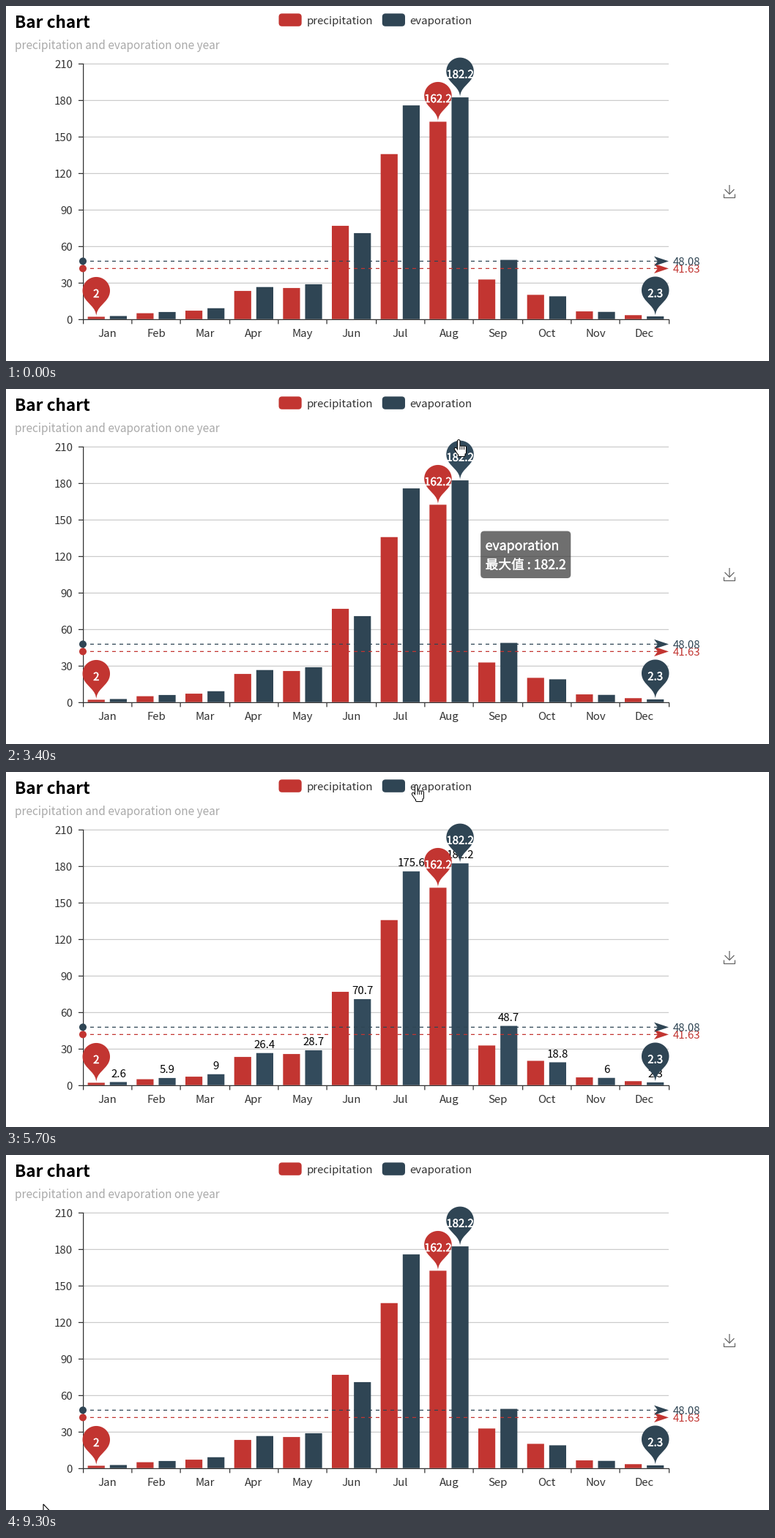
A matplotlib script that plays this animation: 1042x486 px, repeating every 9600 ms.

```python
import numpy as np
import matplotlib.pyplot as plt
from matplotlib.animation import FuncAnimation
from matplotlib.patches import Circle, FancyBboxPatch, PathPatch, Polygon, Rectangle
from matplotlib.path import Path
from matplotlib.patheffects import withStroke

W, H, DPI = 1042, 486, 64
PT = 72 / DPI                       # points per pixel
ZOOM = 1.25                         # screen pixels per layout pixel
FRAMES = 96
LEFT, RIGHT, TOP, BASE = 105, 905, 78.75, 428.75
BAND = (RIGHT - LEFT) / 12
UNIT = (BASE - TOP) / 210
PIN_R = 18.75

MONTHS = "Jan Feb Mar Apr May Jun Jul Aug Sep Oct Nov Dec".split()
NAMES = ["precipitation", "evaporation"]
DATA = np.array([
    [2.0, 4.9, 7.0, 23.2, 25.6, 76.7, 135.6, 162.2, 32.6, 20.0, 6.4, 3.3],
    [2.6, 5.9, 9.0, 26.4, 28.7, 70.7, 175.6, 182.2, 48.7, 18.8, 6.0, 2.3],
])
COLORS = ["#c23531", "#2f4554"]
LIT = ["#d53a35", "#334b5c"]
OFF = "#cccccc"
LEGEND_X = [372.5, 513.8]
LEGEND_W = [129, 124]

# (time, which series are on afterwards)
TOGGLES = [(4.4, (0, 1)), (5.2, (1, 1)), (6.3, (1, 0)), (7.2, (1, 1))]
SHOWN = [(0.4, 4.4), (5.6, 6.3), (7.8, 9.1), (9.3, 9.6)]
ARROW = [(0, 0), (0, 17), (4, 13.4), (6.6, 19), (9, 18), (6.5, 12.4), (11.5, 12.2)]

plt.rcParams["font.family"] = "Noto Sans CJK JP"
fig = plt.figure(figsize=(W / DPI, H / DPI), dpi=DPI, facecolor="white")
ax = fig.add_axes([0, 0, 1, 1])
ax.set(xlim=(0, W), ylim=(H, 0))
ax.axis("off")
live = []                           # artists redrawn in every frame


def crisp(v):
    """Centre of the layout pixel that a hairline at v falls on."""
    return (np.round(2 * v / ZOOM) // 2 + 0.5) * ZOOM


def lerp(a, b, e):
    return a + (b - a) * e


def put(patch, z):
    patch.set_zorder(z)
    ax.add_patch(patch)
    live.append(patch)


def text(x, y, s, size=15, color="#333333", ha="center", z=3, **kw):
    if color == "white":
        kw["path_effects"] = [withStroke(linewidth=0.4 * PT, foreground=color)]
    t = ax.text(x, y + 0.36 * size, s, fontsize=size * PT, color=color, ha=ha,
                va="baseline", zorder=z, **kw)
    live.append(t)
    return t


def line(xs, ys, color, z, width=ZOOM, cap="butt", **kw):
    live.extend(ax.plot(xs, ys, color=color, lw=width * PT, zorder=z, snap=False,
                        solid_capstyle=cap, dash_capstyle=cap, **kw))


def round_box(x, y, w, h, r, color, z, alpha=1):
    style = f"round,pad=0,rounding_size={r}"
    put(FancyBboxPatch((x, y), w, h, boxstyle=style, fc=color, ec="none", alpha=alpha), z)


def slot(mode, s):
    """Offset and width of a bar within its band."""
    room = BAND * 0.8
    if sum(mode) == 1:
        return np.array([BAND * 0.1, room])
    w = room / 2.3
    return np.array([BAND * 0.1 + s * 1.3 * w, w])


def pointer_keys():
    """Time and place: a sweep across the bars, then a few stops."""
    keys = [(0.4, 150, 440)]
    for k in range(15):
        i, s = divmod(k, 2)
        off, w = slot((1, 1), s)
        keys.append((0.5 + k / 7, LEFT + i * BAND + off + w / 4,
                     BASE - 0.8 * DATA[s, i] * UNIT))
    keys += [(2.7, 616, 205), (3.3, 631, 260), (3.4, 618, 72), (3.6, 540, 6),
             (4.1, 440, 18), (5.6, 440, 20), (5.7, 560, 20), (6.2, 560, 20),
             (7.8, 450, 14), (7.9, 450, 14), (8.3, 27, 358), (8.4, 27, 358),
             (8.7, 2, 430), (8.9, 51, 478)]
    return np.array(keys)


KEYS = pointer_keys()


def pointer(t):
    return np.array([np.interp(t, KEYS[:, 0], KEYS[:, k]) for k in (1, 2)])


def tip_track():
    """The tooltip trails the pointer and flips above it near the bottom."""
    pos, track = np.array([300.0, 12.0]), []
    for n in range(FRAMES):
        goal = pointer(n / 10) + 25
        if goal[1] + 65 > H:
            goal[1] -= 115
        if n > 5:
            pos = lerp(pos, goal, 0.45)
        track.append(pos)
    return track


TIPS = tip_track()


def pin_path(x, y):
    r, size = PIN_R, PIN_R / 0.3
    dy = r * r / (size - r)
    cy = y - size + r + dy
    a = np.arcsin(dy / r)
    dx, sx, sy = np.cos(a) * r, np.sin(a) * r * 0.6, np.cos(a) * r * 0.6
    th = np.linspace(np.pi - a, 2 * np.pi + a, 60)
    arc = list(zip(x + r * np.cos(th), cy + r * np.sin(th)))
    low = cy + dy
    curve = [(x + dx - sx, low + sy), (x, y - r * 0.7), (x, y),
             (x, y - r * 0.7), (x - dx + sx, low + sy), (x - dx, low)]
    codes = [Path.MOVETO] + [Path.LINETO] * (len(arc) - 1) + [Path.CURVE4] * 6
    return Path(arc + curve, codes)


def modes(t):
    """Series switched on before and after the latest toggle, and eased progress."""
    old, new, p = (1, 1), (1, 1), 1.0
    for start, after in TOGGLES:
        if t > start - 0.01:
            old, new = new, after
            p = np.clip((t - start + 0.05) / 0.3, 0, 1)
    return old, new, 1 - (1 - p) ** 3


def top_value(mode):
    return 180 if mode == (1, 0) else 210


def marks(s):
    return [(DATA[s].argmax(), "最大值"), (DATA[s].argmin(), "最小值")]


def visible(t):
    return any(a - 0.01 < t < b - 0.01 for a, b in SHOWN)


def hit(t):
    """What lies under the pointer: (kind, series, index, label)."""
    if not visible(t):
        return None
    x, y = pointer(t)
    for s in (0, 1):
        if 0 <= x - LEGEND_X[s] <= LEGEND_W[s] and 10 <= y <= 28:
            return "legend", s, -1, ""
    for s in (1, 0):
        off, w = slot((1, 1), s)
        for i, name in marks(s):
            cx = LEFT + i * BAND + off + w / 2
            cy = BASE - DATA[s, i] * UNIT - 35.7
            if np.hypot(x - cx, y - cy) < PIN_R:
                return "pin", s, i, name
        i = int((x - LEFT) // BAND)
        if 0 <= i < 12 and 0 <= x - LEFT - i * BAND - off <= w:
            if BASE - DATA[s, i] * UNIT <= y <= BASE:
                return "bar", s, i, MONTHS[i]
    return None


def draw_axis(unit, limit):
    for v in range(0, limit + 1, 30):
        y = crisp(TOP if v == limit == 210 else BASE - v * unit)
        if v:
            line([LEFT, RIGHT], [y, y], "#cccccc", 1)
        line([LEFT - 6, LEFT], [y, y], "#333333", 2.5)
        text(91, y + 0.6, str(v), ha="right")
    x, y = crisp(LEFT), crisp(BASE)
    line([x, x], [TOP, y + 0.6], "#333333", 2.5)
    line([LEFT, RIGHT + 1], [y, y], "#333333", 2.5)
    for i in range(13):
        x = crisp(LEFT + i * BAND)
        line([x, x], [y, y + 6], "#333333", 2.5)
    for i, name in enumerate(MONTHS):
        text(LEFT + (i + 0.5) * BAND, 448, name)


def draw_series(s, old, new, e, unit, over):
    if not new[s] and (e >= 1 or not old[s]):
        return
    grow = 1
    if not new[s]:
        off, w = slot(old, s)
        w *= 1 - e
    elif not old[s]:
        off, w = slot(new, s)
        grow = e
    else:
        off, w = lerp(slot(old, s), slot(new, s), e)

    for i, v in enumerate(DATA[s]):
        x, h = LEFT + i * BAND + off, v * unit * grow
        lit = over and over[1] == s and (
            over[0] == "legend" or (over[0] == "bar" and over[2] == i))
        put(Rectangle((x, BASE - h), w, h, fc=LIT[s] if lit else COLORS[s],
                      ec="none", snap=False), 2)
        if lit:
            text(x + w / 2, BASE - h - 12, f"{v:g}", color="black")
    if not new[s]:
        return

    mean = np.floor(DATA[s].mean() * 100 + 0.5001) / 100
    y, c = crisp(BASE - mean * unit), COLORS[s]
    line([LEFT, RIGHT - 15], [y, y], c, 4, ls=(0, (4, 4)))
    put(Circle((LEFT, y), 5, fc=c, ec="none"), 4)
    put(Polygon([(RIGHT, y), (RIGHT - 20, y - 6.7), (RIGHT - 15, y),
                 (RIGHT - 20, y + 6.7)], fc=c, ec="none"), 4)
    text(911, y + 0.7, f"{mean:.2f}", color=c, ha="left", z=4)

    for i, _ in marks(s):
        x = LEFT + i * BAND + off + w / 2
        y = BASE - DATA[s, i] * unit * grow
        lit = over and over[:3] == ("pin", s, i)
        put(PathPatch(pin_path(x, y), fc=LIT[s] if lit else c, ec="none"), 5 + s * 0.2)
        text(x, y - 31.8, f"{DATA[s, i]:g}", color="white", z=5.1 + s * 0.2)


def draw_legend(new):
    for s in (0, 1):
        x = LEGEND_X[s]
        round_box(x, 10.3, 31.2, 17.5, 4.5, COLORS[s] if new[s] else OFF, 3)
        text(x + 37.7, 20, NAMES[s], color="#333333" if new[s] else OFF, ha="left")


def draw_tip(n, over):
    kind, s, i, label = over
    x, y = TIPS[n]
    dot = kind == "bar"
    sep = ": " if dot else " : "
    indent = 18.5 if dot else 0
    style = dict(size=17.7, color="white", ha="left", z=8)
    a = text(x + 6.5, y + 19.5, NAMES[s], **style)
    b = text(x + 6.5 + indent, y + 45.5, f"{label}{sep}{DATA[s, i]:g}", **style)
    wide = max(a.get_window_extent().width, b.get_window_extent().width + indent)
    round_box(x, y, wide + 13, 64.5, 5, "#323232", 7, alpha=0.7)
    if dot:
        put(Circle((x + 12.7, y + 46.2), 6, fc=COLORS[s], ec="none"), 8)


def draw_hand(x, y):
    # a black shape one pixel larger lies under the white one
    for rim, color, z in ((1, "black", 9), (0, "white", 9.1)):
        for px, py, w, h in ((-1, 0, 2.5, 14), (-1, 8.5, 11, 10), (0, 13, 8.5, 9)):
            round_box(x + px - rim, y + py - 2 - rim, w + 2 * rim, h + 2 * rim,
                      1.2 + rim, color, z)
        line([x - 4, x], [y + 10, y + 16], color, z, 2.5 + 2 * rim, "round")
    for dx in (2, 4.8, 7.6):
        line([x + dx] * 2, [y + 6.5, y + 11], "black", 9.2, 0.9)


def draw_pointer(t, over):
    x, y = pointer(t)
    if over:
        draw_hand(x, y)
    else:
        put(Polygon(np.array(ARROW) + (x, y), fc="white", ec="black", lw=1.1 * PT), 9)


def draw_fixed():
    text(12, 22, "Bar chart", 22.5, "black", "left", weight="bold")
    text(12, 53.5, "precipitation and evaporation one year", 15.4, "#aaaaaa", "left")
    line([980.5, 980.5, 995.5, 995.5], [257.5, 262.5, 262.5, 257.5], "#666666", 3)
    line([988, 988], [245, 257.5], "#666666", 3)
    line([981.5, 988, 994.5], [251, 257.5, 251], "#666666", 3)
    live.clear()


def draw(n):
    for a in live:
        a.remove()
    live.clear()
    t = n / 10
    old, new, e = modes(t)
    limit = top_value(new)
    unit = lerp((BASE - TOP) / top_value(old), (BASE - TOP) / limit, e)
    over = hit(t)

    draw_axis(unit, limit)
    draw_legend(new)
    for s in (0, 1):
        draw_series(s, old, new, e, unit, over)

    # the tooltip lingers for a moment after leaving an item
    item = over or hit(t - 0.1)
    if item and item[0] != "legend":
        draw_tip(n, item)
    if visible(t):
        draw_pointer(t, over)
    return live


draw_fixed()
anim = FuncAnimation(fig, draw, frames=FRAMES, interval=100, repeat=True,
                     repeat_delay=0, blit=False)
plt.show()
```
